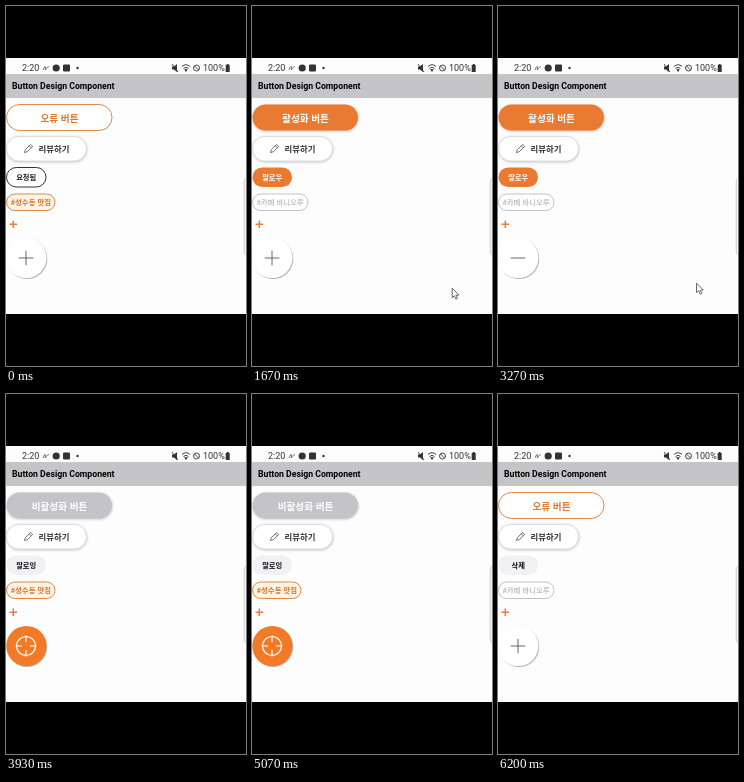
Recreate the animation shown at these times as an HTML page. Size 240 by 360 pixels, loop 6.27 s.

```html
<!DOCTYPE html>
<html lang="ko">
<head>
<meta charset="utf-8">
<title>Button Design Component</title>
<style>
  html, body { margin: 0; width: 100%; height: 100%; overflow: hidden; background: #000; }
  svg { display: block; width: 100%; height: 100%; }
  text { font-family: "Noto Sans CJK KR", "Noto Sans CJK", "Noto Sans CJK JP", sans-serif; }
  .latin { font-family: Roboto, sans-serif; }
  .mid { text-anchor: middle; }
  .line { fill: none; }
</style>
</head>
<body>
<svg viewBox="0 0 240 360">
  <defs>
    <filter id="shadow" x="-20%" y="-30%" width="140%" height="170%">
      <feDropShadow dx=".3" dy=".7" stdDeviation="1" flood-color="#556" flood-opacity=".4"/>
    </filter>
    <filter id="corner-shadow" x="-20%" y="-20%" width="140%" height="140%">
      <feDropShadow dx=".8" dy=".8" stdDeviation=".5" flood-color="#445" flood-opacity=".5"/>
    </filter>
  </defs>
  <rect width="240" height="360"/>
  <rect y="52" width="240" height="256" fill="#fdfdfe"/>

  <g fill="#333">
    <text class="latin" x="16" y="65.200" font-size="9">2:20</text>
    <path class="line" d="M37 64q2-5 2.500-3t-.5 3q3-4 4-3.500" stroke="#555" stroke-width=".8"/>
    <circle cx="50.200" cy="62" r="3.600"/>
    <rect x="57" y="58.500" width="7" height="7" rx="1"/>
    <circle cx="71.500" cy="62" r="1.200"/>
    <path d="M166 60.500h2l3-2.500v8l-3-2.500h-2z"/>
    <path class="line" d="M166 58l6 8" stroke="#333" stroke-width=".9"/>
    <path class="line" d="M176 60.500q4-3.600 8 0M177.500 62.500q2.500-2.400 5 0" stroke="#444"/>
    <path d="M178.300 63.600q1.700-1.300 3.400 0L180 66z"/>
    <circle class="line" cx="190.500" cy="62" r="3" stroke="#333" stroke-width=".9"/>
    <path class="line" d="M188.500 60l4 4" stroke="#333" stroke-width=".9"/>
    <text class="latin" x="197" y="65.200" font-size="9">100%</text>
    <path d="M220.700 58h2v1h1v7h-4v-7h1z"/>
  </g>

  <rect y="68" width="240" height="24" fill="#c5c5c7"/>
  <text class="latin" x="6" y="83.300" font-size="8.700" font-weight="700">Button Design Component</text>

  <g id="main">
    <rect x=".5" y="98.500" width="105.500" height="26" rx="13"/>
    <text class="mid" x="53.500" y="115.500" font-size="9.600" font-weight="700"></text>
  </g>

  <rect x=".5" y="130.500" width="80" height="24.500" rx="12.250" fill="#fff" stroke="#d2d2d8" stroke-width=".7" filter="url(#shadow)"/>
  <path class="line" d="M18.500 146.500l.8-2.800 5.400-5.200 2 2-5.400 5.200zM23.300 139.900l2 2" stroke="#5a504a" stroke-width=".8" stroke-linejoin="round"/>
  <text x="32.600" y="146" font-size="8.400" font-weight="700" fill="#333">리뷰하기</text>

  <g id="follow">
    <rect x=".5" y="161.500" width="39.500" height="19.500" rx="9.750"/>
    <text class="mid" x="20.200" y="174" font-size="7.300" font-weight="700"></text>
  </g>

  <g id="tag">
    <rect x=".5" y="188" width="48.500" height="16.500" rx="8.250"/>
    <text x="4.700" y="199.200" font-size="7.400"></text>
  </g>

  <path d="M3.500 218.200h7.600M7.300 214.400v7.600" stroke="#e87c3c" stroke-width="1.500"/>

  <g id="fab">
    <circle cx="20.300" cy="252" r="20" filter="url(#corner-shadow)"/>
    <path class="line"/>
  </g>

  <path d="M240 172q-1.800 1-1.800 4v69q0 3 1.800 4" fill="#f2f2f3" stroke="#c8c8cc" stroke-width=".8"/>
  <path id="cursor" d="M0 0v9.500l2.200-2 1.500 3.500 1.600-.7-1.500-3.400h3z" fill="#fff" stroke="#444" stroke-width=".8" stroke-linejoin="round"/>
</svg>

<script>
const LOOP = 6270;
const ORANGE = "#f27a26";
const SOFT_ORANGE = "#e97a30";
const BORDER = "#e08a4a";

const MAIN = {
  error: { label: "오류 버튼", fill: "#fff", stroke: BORDER, ink: "#df782f" },
  active: { label: "활성화 버튼", fill: SOFT_ORANGE, stroke: "none", ink: "#fff", raised: true },
  disabled: { label: "비활성화 버튼", fill: "#c4c4c8", stroke: "none", ink: "#fff", raised: true }
};
const FOLLOW = {
  requested: { label: "요청됨", fill: "#fff", stroke: "#333", ink: "#222" },
  follow: { label: "팔로우", fill: SOFT_ORANGE, stroke: "none", ink: "#fff" },
  following: { label: "팔로잉", fill: "#f1f1f4", stroke: "none", ink: "#111" },
  remove: { label: "삭제", fill: "#f1f1f4", stroke: "none", ink: "#111" }
};
const TAG = {
  on: { label: "#성수동 맛집", fill: "#fff3e6", stroke: BORDER, ink: "#da742f", width: 48.5, weight: 700 },
  off: { label: "#카페 바니오루", fill: "#fff", stroke: "#c2c2c6", ink: "#a5a5a9", width: 55.5, weight: 400 }
};
const FAB = {
  plus: { d: "M12.800 252h14.500M20 244.800v14.500", fill: "#fff", stroke: "#555", line: 0.9 },
  minus: { d: "M12.800 252h14.500", fill: "#fff", stroke: "#666", line: 1 },
  target: {
    d: "M10.500 252a9.500 9.500 0 1 0 19 0a9.500 9.500 0 1 0-19 0M9.500 252h6.500M24 252h6.500M20 241.500v6.500M20 256v6.500",
    fill: ORANGE, stroke: "#fff", line: 1.2
  }
};
const SCENES = [
  { until: 1100, main: "error", follow: "requested", tag: "on", fab: "plus" },
  { until: 2470, main: "active", follow: "follow", tag: "off", fab: "plus" },
  { until: 3900, main: "active", follow: "follow", tag: "off", fab: "minus" },
  { until: 5935, main: "disabled", follow: "following", tag: "on", fab: "target" },
  { until: LOOP, main: "error", follow: "remove", tag: "off", fab: "plus" }
];

const byId = id => document.getElementById(id);
const setAttrs = (el, attrs) => {
  for (const key in attrs) el.setAttribute(key, attrs[key]);
};

function paintButton(id, look) {
  const [box, text] = byId(id).children;
  setAttrs(box, { fill: look.fill, stroke: look.stroke, filter: look.raised ? "url(#shadow)" : "none" });
  if (look.width) box.setAttribute("width", look.width);
  if (look.weight) text.setAttribute("font-weight", look.weight);
  text.setAttribute("fill", look.ink);
  text.textContent = look.label;
}

function paintScene(scene) {
  paintButton("main", MAIN[scene.main]);
  paintButton("follow", FOLLOW[scene.follow]);
  paintButton("tag", TAG[scene.tag]);
  const look = FAB[scene.fab];
  const [disc, icon] = byId("fab").children;
  disc.setAttribute("fill", look.fill);
  setAttrs(icon, { d: look.d, stroke: look.stroke, "stroke-width": look.line });
}

function paintCursor(t) {
  const visible = t >= 1100 && t < 3900;
  const p = Math.min(1, Math.max(0, (t - 1670) / 1600));
  const ease = p * p * (3 - 2 * p);
  setAttrs(byId("cursor"), {
    visibility: visible ? "visible" : "hidden",
    transform: `translate(${200.2 - 1.7 * ease} ${282.2 - 5 * ease})`
  });
}

let shown;
function draw(t) {
  const scene = SCENES.find(s => t < s.until);
  if (scene !== shown) paintScene(shown = scene);
  paintCursor(t);
}

const start = performance.now();
function tick() {
  draw((performance.now() - start) % LOOP);
  requestAnimationFrame(tick);
}
tick();
</script>
</body>
</html>
```
